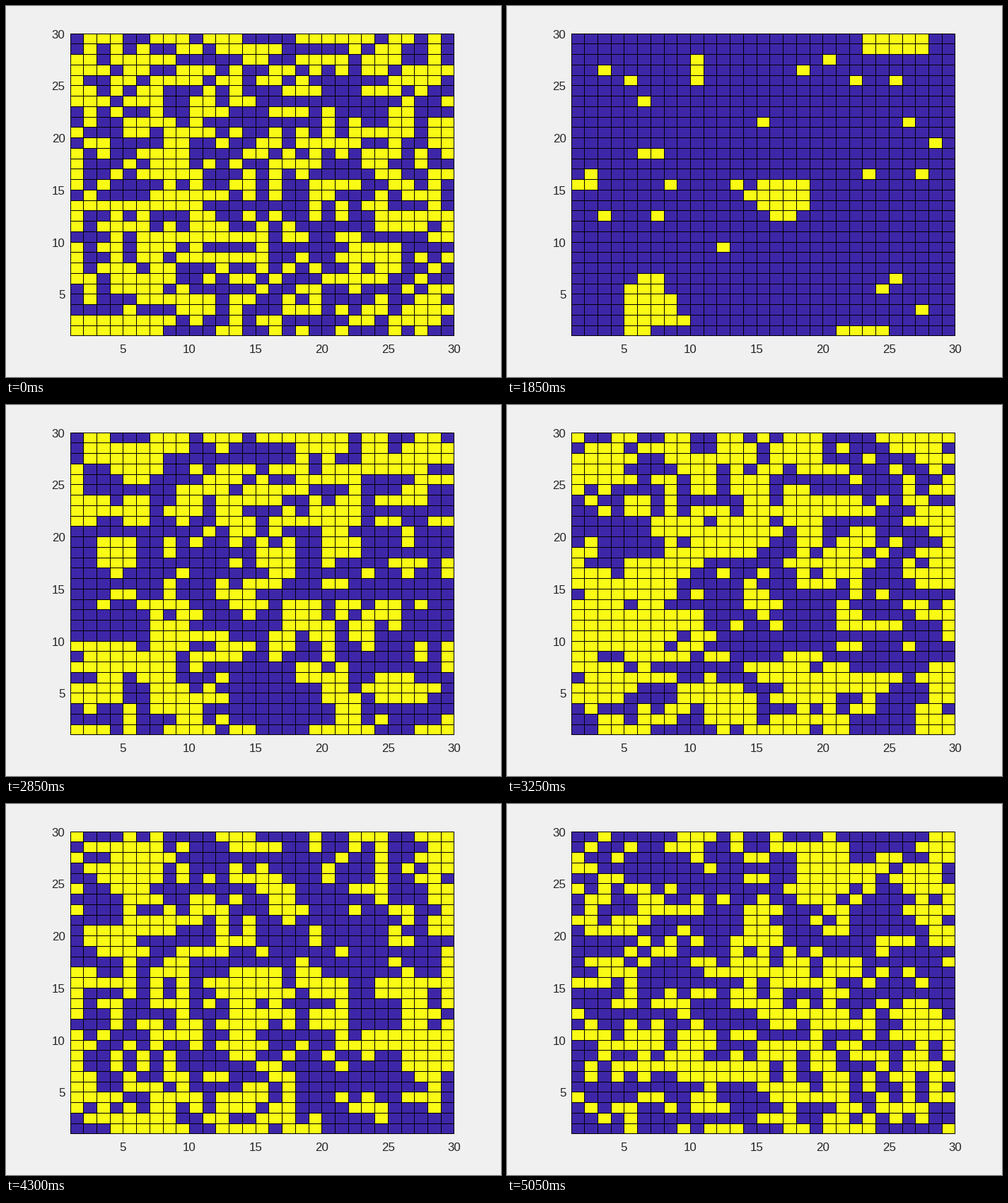
A matplotlib script for the animation above (5100 ms loop, 700x525 px).

```python
import numpy as np
import matplotlib.pyplot as plt
from matplotlib.animation import FuncAnimation

W, H, DPI = 700, 525, 100
N = 30              # lattice size; the last row and column stay hidden
FRAMES, INTERVAL = 102, 50
SWEEPS = 12
QUENCH = 11         # frames of cooling before the temperature ramp

BLUE, YELLOW = (62, 38, 168), (249, 251, 21)
BACK, INK = "#f0f0f0", "#262626"

plt.rcParams["font.family"] = "Liberation Sans"


def conditions(k):
    """Temperature and field at step k: a short quench, then steady heating."""
    if k <= QUENCH:
        return 0.9, -0.05 * k
    return np.interp(k, [QUENCH, 37, 57, FRAMES], [1.35, 2.1, 3.6, 5.5]), 0.0


def simulate():
    """Heat-bath Ising model on a periodic lattice, one state per frame."""
    rng = np.random.default_rng(7)
    spins = rng.choice([-1, 1], size=(N, N))
    odd = np.indices((N, N)).sum(axis=0) % 2
    states = [spins.copy()]
    for k in range(1, FRAMES):
        temp, field = conditions(k)
        for _ in range(SWEEPS):
            for parity in (0, 1):
                near = sum(np.roll(spins, d, axis) for d in (-1, 1) for axis in (0, 1))
                p_up = 1 / (1 + np.exp(-2 * (near + field) / temp))
                drawn = np.where(rng.random((N, N)) < p_up, 1, -1)
                spins = np.where(odd == parity, drawn, spins)
        states.append(spins.copy())
    return states


# Pixel positions of the grid lines
xs = np.floor(91.05 + 18.722 * np.arange(N)).astype(int)
ys = np.floor(39.1 + 14.754 * np.arange(N)).astype(int)
cols = np.arange(xs[0], xs[-1] + 1)
rows = np.arange(ys[0], ys[-1] + 1)
col_cell = np.clip(np.searchsorted(xs, cols, side="right") - 1, 0, N - 2)
row_cell = N - 2 - np.clip(np.searchsorted(ys, rows, side="right") - 1, 0, N - 2)
palette = np.array([BLUE, YELLOW], dtype=np.uint8)


def paint(spins):
    up = (spins > 0).astype(int)
    img = palette[up[np.ix_(row_cell, col_cell)]]
    img[ys - ys[0]] = 0
    img[:, xs - xs[0]] = 0
    return img


fig = plt.figure(figsize=(W / DPI, H / DPI), dpi=DPI, facecolor=BACK)
ax = fig.add_axes([0, 0, 1, 1])
ax.axis("off")

states = simulate()
board = ax.imshow(
    paint(states[0]), interpolation="nearest", aspect="auto",
    extent=(xs[0], xs[-1] + 1, ys[-1] + 1, ys[0]),
)
ax.set_xlim(0, W)
ax.set_ylim(H, 0)

label = dict(fontsize=12.2, color=INK, va="baseline")
for v in range(5, N + 1, 5):
    ax.text(xs[v - 1] + 0.5, 491, str(v), ha="center", **label)
    ax.text(83.5, ys[N - v] + 7, str(v), ha="right", **label)


def update(k):
    board.set_data(paint(states[k]))
    return (board,)


anim = FuncAnimation(fig, update, frames=FRAMES, interval=INTERVAL,
                     repeat=True, repeat_delay=0, blit=False)
plt.show()
```
